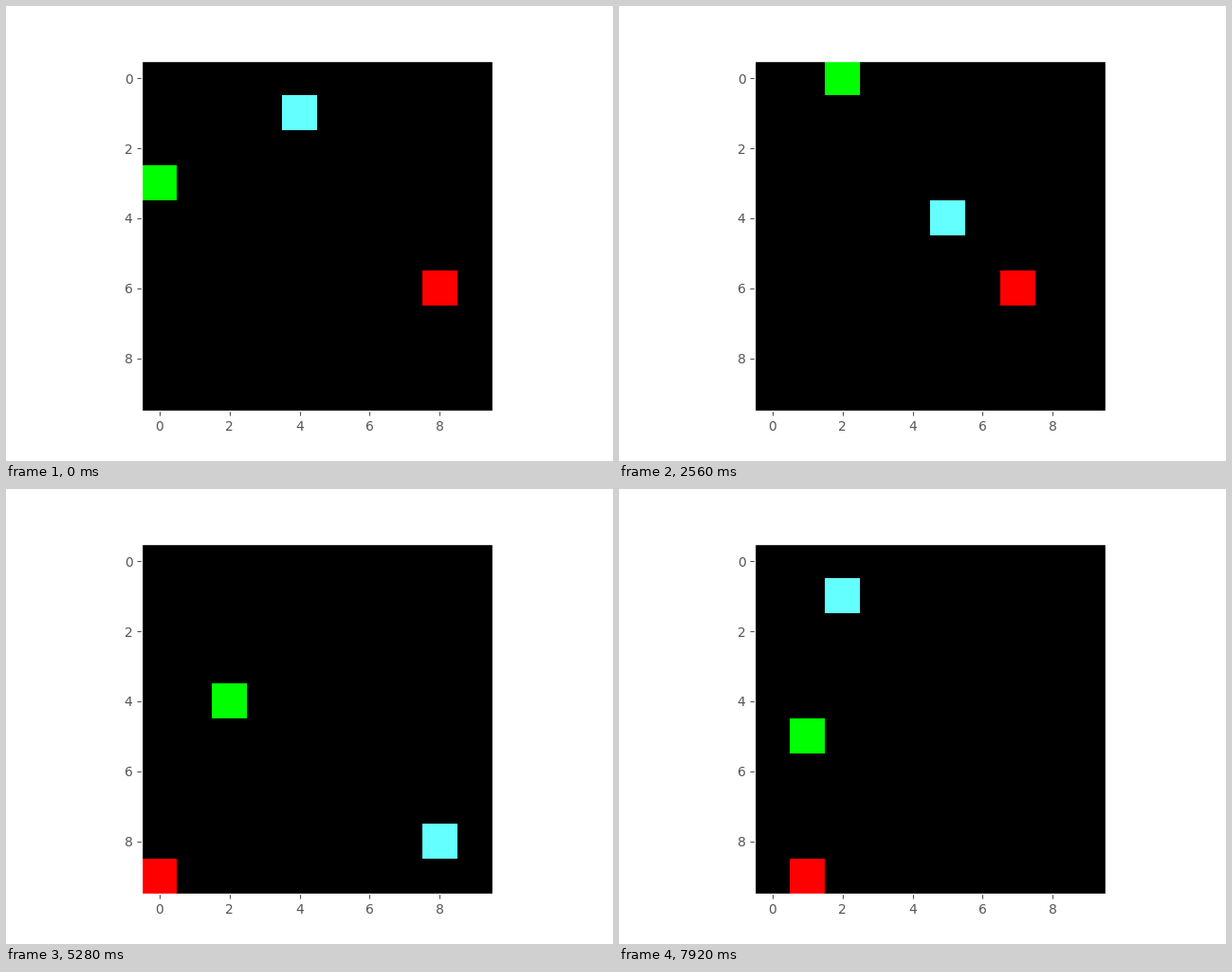
These frames come from a looping animation (640x480 px, 8 s). A matplotlib script:

```python
import numpy as np
import matplotlib.pyplot as plt
from matplotlib.animation import FuncAnimation

FRAMES, INTERVAL, SIZE = 100, 80, 10
KEY_TIMES = (0, 12, 32, 49, 66, 78, 99)

plt.rcParams.update({
    "font.family": "DejaVu Sans",
    "font.size": 10,
    "axes.edgecolor": "white",
    "axes.linewidth": 1,
    "xtick.color": "#555555",
    "ytick.color": "#555555",
})


def walk(keys, steps, rng):
    """Random walk along one axis, clamped to the grid, through the key cells."""
    cells = np.arange(SIZE)
    move = sum(np.eye(SIZE)[np.clip(cells + s, 0, SIZE - 1)] for s in steps)

    # Likelihood of meeting all later keys from each cell
    chance = np.ones((FRAMES, SIZE))
    for t, key in zip(KEY_TIMES, keys):
        chance[t] = cells == key
    for t in reversed(range(FRAMES - 1)):
        chance[t] *= move @ chance[t + 1]
        chance[t] /= chance[t].sum()

    path = [keys[0]]
    for t in range(1, FRAMES):
        weight = move[path[-1]] * chance[t]
        path.append(rng.choice(SIZE, p=weight / weight.sum()))
    return path


class Blob:
    def __init__(self, color, steps, key_cells, seed):
        rng = np.random.default_rng(seed)
        self.color = color
        self.cols, self.rows = (walk(keys, steps, rng) for keys in zip(*key_cells))


# Food and enemy drift in any direction or rest; the player only moves diagonally.
DRIFT, DIAGONAL = (-1, 0, 1), (-1, 1)

food = Blob((0, 255, 0), DRIFT,
            [(0, 3), (1, 7), (2, 0), (0, 1), (2, 4), (3, 2), (1, 5)], seed=1)
player = Blob((100, 255, 255), DIAGONAL,
              [(4, 1), (1, 6), (5, 4), (7, 7), (8, 8), (2, 2), (2, 1)], seed=2)
enemy = Blob((255, 0, 0), DRIFT,
             [(8, 6), (6, 7), (7, 6), (0, 7), (0, 9), (3, 7), (1, 9)], seed=3)


def grid(frame):
    env = np.zeros((SIZE, SIZE, 3), dtype=np.uint8)
    for blob in (food, player, enemy):
        env[blob.rows[frame], blob.cols[frame]] = blob.color
    return env


fig, ax = plt.subplots(figsize=(6.4, 4.8), dpi=100)
image = ax.imshow(grid(0), interpolation="nearest")


def update(frame):
    image.set_data(grid(frame))
    return image,


anim = FuncAnimation(fig, update, frames=FRAMES, interval=INTERVAL,
                     repeat=True, repeat_delay=0)
plt.show()
```
